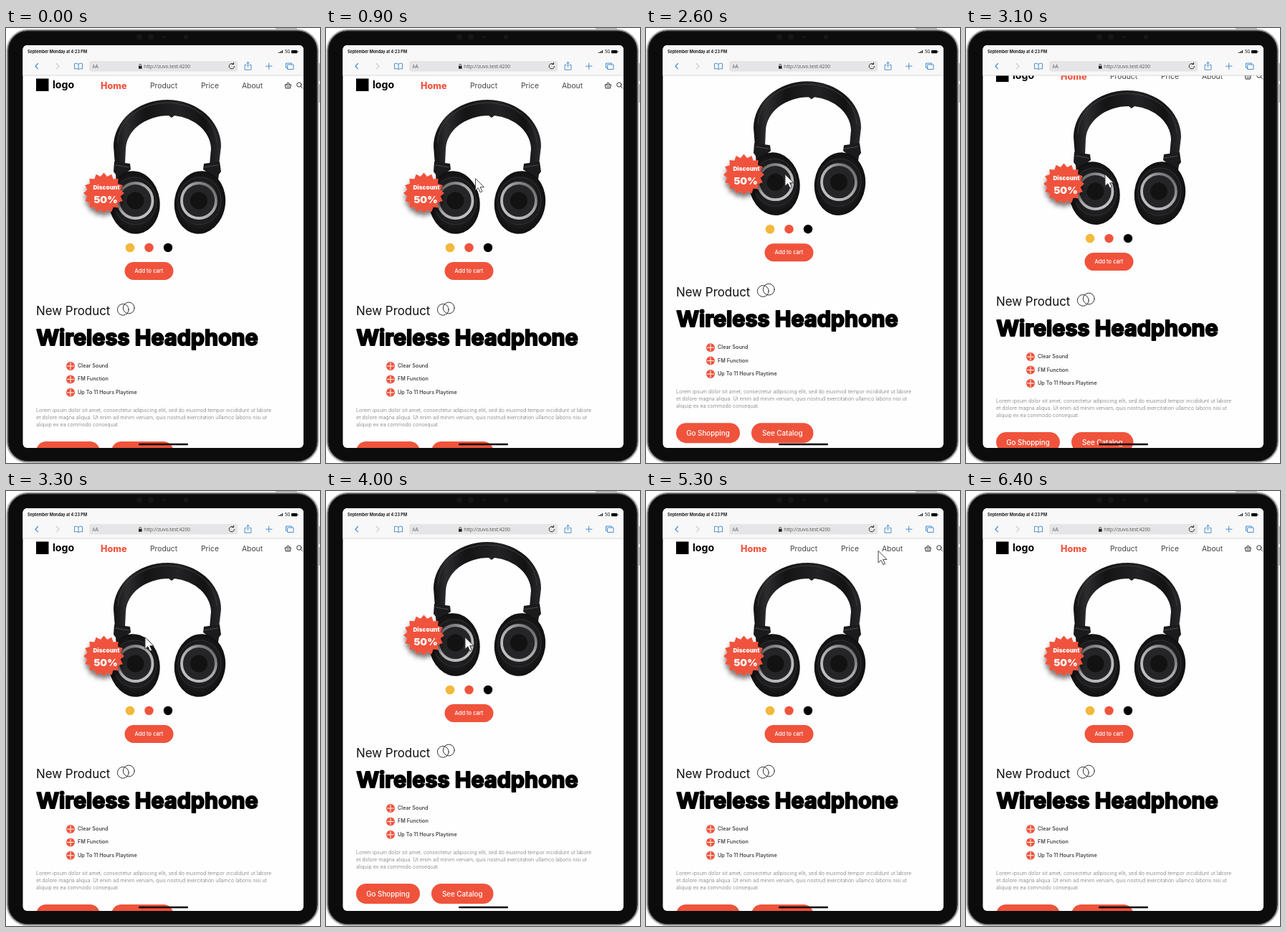
These frames come from a looping animation (438x606 px, 7.2 s). An HTML page:

```html
<!DOCTYPE html>
<html lang="en">
<head>
<meta charset="utf-8">
<title>Headphone shop</title>
<style>
html, body { margin: 0; width: 100%; height: 100%; overflow: hidden; background: #fff; }
svg { display: block; width: 100%; height: 100%; font-family: Inter, "Open Sans", sans-serif; }
.red { fill: #f0533c; }
.mid { text-anchor: middle; }
.nav { font-size: 10.3px; fill: #444; }
.button { font-size: 9.8px; font-weight: 500; fill: #fff; text-anchor: middle; }
.feature { font-size: 7.25px; font-weight: 500; fill: #333; }
.body { font-size: 7.14px; font-weight: 300; fill: #777; }
.line { fill: none; stroke-linecap: round; stroke-linejoin: round; }
.blue { stroke: #4a90cf; }
</style>
</head>
<body>
<svg viewBox="0 0 438 606">
  <defs>
    <clipPath id="screen"><rect x="23.5" y="24" width="391.5" height="561" rx="6"/></clipPath>
    <clipPath id="view"><rect x="23" y="66" width="392" height="520"/></clipPath>
    <linearGradient id="band" x2="1">
      <stop stop-color="#111"/><stop offset=".12" stop-color="#2c2c2f"/>
      <stop offset=".3" stop-color="#141415"/><stop offset=".6" stop-color="#232325"/>
      <stop offset=".85" stop-color="#121213"/><stop offset="1" stop-color="#2a2a2d"/>
    </linearGradient>
    <radialGradient id="cup"><stop offset=".6" stop-color="#202022"/><stop offset="1" stop-color="#101011"/></radialGradient>
    <linearGradient id="ring" x2="1" y2="1">
      <stop stop-color="#555"/><stop offset=".4" stop-color="#a4a4a6"/><stop offset="1" stop-color="#cacacc"/>
    </linearGradient>
    <filter id="shade" x="-30%" y="-30%" width="160%" height="170%">
      <feDropShadow dx="0" dy="5" stdDeviation="3" flood-opacity=".55"/>
    </filter>
  </defs>

  <!-- tablet -->
  <g fill="#b9b9bb">
    <rect x="376" y="0" width="30" height="4" rx="1"/>
    <rect x="434" y="49" width="4" height="25" rx="1"/>
    <rect x="434" y="78" width="4" height="26" rx="1"/>
  </g>
  <rect x="1.5" y="2.5" width="434" height="602.5" rx="29" fill="#0c0c0d" stroke="#b0b0b2" stroke-width="2"/>
  <rect x="3" y="4" width="431" height="599.5" rx="27.5" fill="none" stroke="#4a4a4c"/>
  <g fill="#161618">
    <circle cx="186" cy="12.5" r="4"/><circle cx="202" cy="12.5" r="4"/>
    <circle cx="220" cy="12.5" r="2"/><circle cx="251" cy="12.5" r="3.5"/>
  </g>

  <g clip-path="url(#screen)">
    <rect x="23" y="24" width="393" height="562" fill="#fefefe"/>

    <g clip-path="url(#view)"><g id="page">
      <rect x="42" y="70.5" width="17.5" height="17.5"/>
      <text x="65" y="84" font-size="14.2" font-weight="700">logo</text>
      <text class="red" x="132" y="84.5" font-size="12.6" font-weight="800">Home</text>
      <g class="nav">
        <text x="201" y="84">Product</text><text x="272" y="84">Price</text><text x="329" y="84">About</text>
      </g>
      <g class="line" stroke="#333">
        <path d="M389.5 79h8l-1.2 5h-5.6zM391.2 79l1.3-2.6h2l1.3 2.6M392.3 81v1.5M394.7 81v1.5"/>
        <circle cx="408.8" cy="79" r="3.1"/><path d="M411.2 81.400l2.600 2.600"/>
      </g>

      <!-- headphones -->
      <path fill="url(#band)" d="M152 190L150 165A75 65 0 0 1 300 165L297 190H284L286 168A58 48 0 0 0 235 122L231 125L227 122A60 48 0 0 0 167 168L166 190Z"/>
      <path class="line" stroke="#3c3c40" d="M156 160A69 56 0 0 1 294 160"/>
      <g fill="#1b1b1d">
        <path d="M151 186l22 3 1 8-4 3 16 4-10 14-22 0-1-14-3-4z"/>
        <path d="M298 186l-22 3-1 8 4 3-16 4 10 14 22 0 2-14 3-4z"/>
      </g>
      <path class="line" stroke="#4c4c50" d="M153 191l18 3M295 191l-18 3"/>
      <g id="cups"></g>

      <g filter="url(#shade)"><polygon id="badge" class="red"/></g>
      <g fill="#fff" class="mid" font-weight="900">
        <text x="140" y="225" font-size="8.2">Discount</text>
        <text x="139" y="243.5" font-size="13.8">50%</text>
      </g>

      <circle cx="173" cy="306" r="6.3" fill="#f4b83a"/>
      <circle cx="199.5" cy="306" r="6.2" class="red"/>
      <circle cx="226" cy="306" r="6.2"/>
      <rect class="red" x="165.5" y="326" width="68" height="25" rx="12.5"/>
      <text class="mid" x="199.5" y="341.2" font-size="7.5" font-weight="500" fill="#fff">Add to cart</text>

      <text x="42" y="400" font-size="16.9" fill="#111">New Product</text>
      <g class="line" stroke="#333"><circle cx="163.3" cy="392.3" r="7.9"/><circle cx="171.3" cy="390" r="7.9"/></g>
      <text x="42.5" y="441.8" font-size="30.45" font-weight="700" stroke="#000" stroke-width="2" stroke-linejoin="round">Wireless Headphone</text>

      <g id="features"></g>
      <g class="body">
        <text x="42" y="535.2">Lorem ipsum dolor sit amet, consectetur adipiscing elit, sed do eiusmod tempor incididunt ut labore</text>
        <text x="42" y="545.1">et dolore magna aliqua. Ut enim ad minim veniam, quis nostrud exercitation ullamco laboris nisi ut</text>
        <text x="42" y="555">aliquip ex ea commodo consequat.</text>
      </g>
      <rect class="red" x="42" y="576" width="89" height="28" rx="14"/>
      <rect class="red" x="147" y="576" width="86.5" height="28" rx="14"/>
      <text class="button" x="86.5" y="593.5">Go Shopping</text>
      <text class="button" x="190.2" y="593.5">See Catalog</text>
    </g></g>

    <!-- browser bar -->
    <rect x="23" y="24" width="393" height="42" fill="#f8f8f8"/>
    <path d="M23 66h393" stroke="#d8d8d8"/>
    <text x="30" y="35" font-size="5.55" font-weight="600">September Monday at 4:23 PM</text>
    <path d="M380 35v-1h1v1zM381.7 35v-2h1v2zM383.4 35v-3h1v3zM385.1 35v-4h1v4z"/>
    <text x="389" y="35" font-size="5.6">5G</text>
    <rect x="398" y="31" width="8.3" height="4.2" rx="1"/><rect x="406.7" y="32.2" width=".8" height="1.8"/>
    <rect x="116" y="46" width="207" height="14.5" rx="3" fill="#e5e5e7"/>
    <g class="line blue">
      <path stroke-width="1.3" d="M44.5 49.5l-3.5 3.7 3.5 3.7"/>
      <path stroke="#d0d0d2" stroke-width="1.3" d="M70.5 49.5l3.5 3.7-3.5 3.7"/>
      <path d="M101 50.3q-3-2-5.5-.6v7.3q3-1.2 5.5.6q2.5-1.8 5.5-.6v-7.3q-2.5-1.4-5.5.6v7.3"/>
      <path d="M335.3 51.5h-2.3v6.7h9v-6.7h-2.3M337.5 54.5v-7M335.4 49.3l2.1-2.1 2.1 2.1"/>
      <path d="M362.5 53.2h8.5M366.75 49v8.5"/>
      <path d="M393 51h8v6.5h-8zM392.5 55.5h-2v-6.5h8v1.5"/>
    </g>
    <text x="120.5" y="56" font-size="5.5" fill="#555">A<tspan font-size="6.8">A</tspan></text>
    <rect x="185" y="53" width="4.6" height="3.8" rx=".6" fill="#222"/>
    <path class="line" stroke="#222" stroke-width=".8" d="M186 53v-1.3a1.3 1.3 0 0 1 2.6 0V53"/>
    <text x="192.3" y="56" font-size="6.7" fill="#555" font-family="Open Sans, sans-serif">http://zuvo.test:4200</text>
    <path class="line" stroke="#333" d="M318.6 53.5a3.7 3.7 0 1 1-1.5-3.3M317.5 48.2v2.3h-2.3"/>

    <rect x="185" y="578.7" width="69" height="2.5" rx="1.25"/>
    <path id="cursor" d="M0 0V16.5L3.9 13L6.8 19.2L9.5 18L6.7 12H12Z" fill="#fff" stroke="#333" stroke-width=".9" stroke-linejoin="round"/>
  </g>
</svg>

<script>
const $ = id => document.getElementById(id);

$('badge').setAttribute('points', Array.from({ length: 32 }, (_, i) => {
  const a = i * Math.PI / 16, r = i % 2 ? 23.5 : 28.5;
  return `${136.5 + r * Math.sin(a)},${230 - r * Math.cos(a)}`;
}).join(' '));

// The right cup mirrors the left one.
$('cups').innerHTML = [[179, 1], [270.5, -1]].map(([x, side]) => `
  <g transform="translate(${x} 243) scale(${side} 1)">
    <ellipse rx="35.5" ry="44" fill="url(#cup)" transform="rotate(-8)"/>
    <ellipse cx="1" cy="-2" rx="30" ry="33" fill="none" stroke="#303033" transform="rotate(-8)"/>
    <ellipse cx="1.5" cy="-2.5" rx="24" ry="24.5" fill="#252528" stroke="url(#ring)" stroke-width="3.8"/>
    <circle cx="1.5" cy="-2.5" r="12" fill="#121213"/>
  </g>`).join('');

$('features').innerHTML = ['Clear Sound', 'FM Function', 'Up To 11 Hours Playtime'].map((label, i) => {
  const y = 471 + i * 18.4;
  return `<circle class="red" cx="90" cy="${y}" r="6"/>
    <path d="M85 ${y}h10M90 ${y - 5}v10" stroke="#fff"/>
    <text class="feature" x="100" y="${y + 2}">${label}</text>`;
}).join('');

// Each move is [start, duration, target], eased out.
const track = (t, value, moves) => {
  for (const [start, length, target] of moves) {
    const p = Math.min(1, Math.max(0, (t - start) / length));
    value += (target - value) * p * (2 - p);
  }
  return value;
};
const scroll = [[1700, 200, 29], [2300, 200, 0], [2500, 150, 29], [3000, 300, 0], [3700, 300, 29], [4100, 300, 0]];
const cursorX = [[300, 800, 194], [4400, 400, 305], [4900, 200, 318], [5200, 200, 326], [5500, 800, 433]];
const cursorY = [[300, 800, 203.7], [4400, 400, 100], [4900, 200, 89], [5200, 200, 81.5], [5500, 800, 96]];

function draw(now) {
  const t = Math.floor(now % 7200 / 100) * 100;
  $('page').setAttribute('transform', `translate(0 ${-track(t, 0, scroll)})`);
  $('cursor').setAttribute('transform', `translate(${track(t, 425, cursorX)} ${track(t, 300, cursorY)})`);
  $('cursor').style.display = t >= 400 && t < 6300 ? '' : 'none';
}
const began = performance.now();
function frame() {
  draw(performance.now() - began);
  requestAnimationFrame(frame);
}
frame();
</script>
</body>
</html>
```
